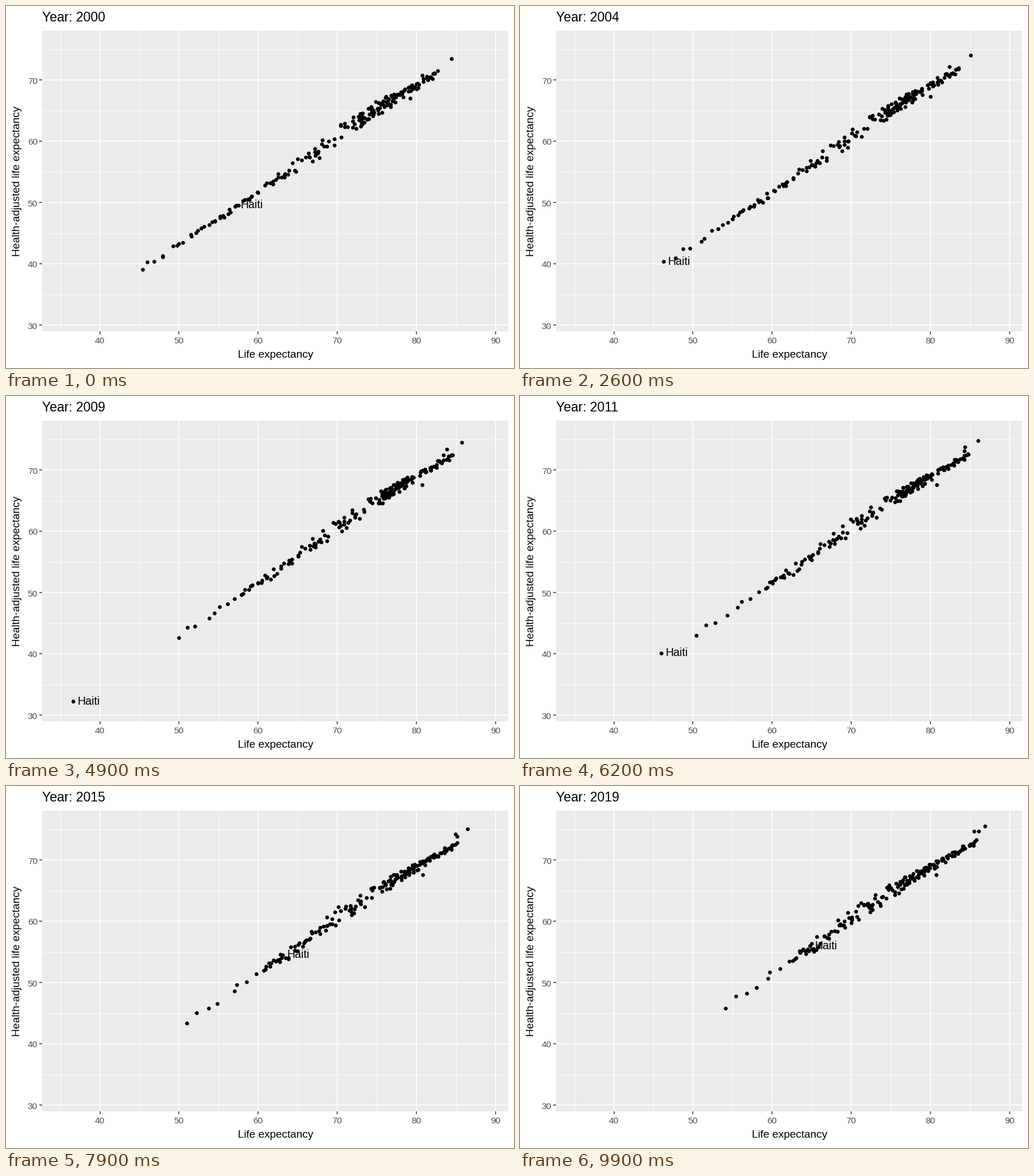
A matplotlib script that plays this animation: 885 px wide and 632 px high, repeating every 10000 ms.

```python
import matplotlib.pyplot as plt
import numpy as np
from matplotlib.animation import FuncAnimation

W, H, FRAMES = 885, 632, 100
LEFT, RIGHT, TOP, BOTTOM = 63, 875, 43, 568
plt.rcParams["font.family"] = "Liberation Sans"

# Points move in straight lines between the survey years
YEARS = np.array([2000, 2010, 2015, 2019])
KEYS = np.round((YEARS - 2000) * (FRAMES - 1) / 19).astype(int)
COUNT = 178

# Life expectancy at a few quantiles of the crowd, per survey year
QUANTILES = [0, 0.04, 0.2, 0.47, 0.79, 1]
LIFE = [
    [45.2, 50.7, 60.6, 72.6, 77.3, 82.5],
    [50.4, 57.9, 65.7, 75.8, 78.8, 84.6],
    [50.8, 60.2, 66.7, 76.1, 80.3, 84.9],
    [54.2, 62.5, 68.2, 75.9, 80.8, 85.7],
]

# Countries apart from the crowd: life per survey year, healthy start, slope
SOLO = [
    ([57.2, 35.35, 63.0, 64.8], 49.6, 0.842),  # the labelled one
    ([84.4, 85.8, 86.4, 86.9], 73.5, 0.80),
    ([80.7, 84.0, 84.9, 85.5], 70.8, 0.82),
    ([78.0, 83.7, 85.1, 86.1], 68.1, 0.81),
    ([79.2, 80.8, 80.8, 80.7], 67.0, 0.40),
]


def healthy(life, year):
    base = np.interp(life, [45, 55, 65, 71, 77, 83, 87],
                     [39.1, 47.4, 56.1, 61.9, 66.9, 71.5, 74.2])
    return base - 0.02 * (year - 2000)


def build_states():
    rng = np.random.default_rng(12)
    u = np.linspace(0, 1, COUNT)
    u += 0.04 * u * (1 - u) * rng.normal(size=COUNT)
    resid = np.clip(rng.normal(size=COUNT), -1.7, 1.7)
    states = []
    for k, year in enumerate(YEARS):
        x = np.interp(u, QUANTILES, LIFE[k]) + rng.normal(0, 0.2, COUNT)
        spread = 0.2 + 0.6 * np.exp(-((x - 70) / 9) ** 2)
        y = healthy(x, year) + spread * (resid + rng.normal(0, 0.15, COUNT))
        solo = [(life[k], start + slope * (life[k] - life[0])) for life, start, slope in SOLO]
        states.append(np.vstack([solo, np.column_stack([x, y])]))
    return states


STATES = build_states()


def positions(frame):
    k = min(np.searchsorted(KEYS, frame, side="right") - 1, len(KEYS) - 2)
    t = (frame - KEYS[k]) / (KEYS[k + 1] - KEYS[k])
    return (1 - t) * STATES[k] + t * STATES[k + 1]


def px(life):
    return 163.5 + 13.79 * (life - 40)


def py(health):
    return 129.3 + 10.7 * (70 - health)


fig = plt.figure(figsize=(W / 72, H / 72), dpi=72, facecolor="white")
ax = fig.add_axes([0, 0, 1, 1])
ax.set(xlim=(0, W), ylim=(H, 0))
ax.axis("off")
ax.add_patch(plt.Rectangle((LEFT, TOP), RIGHT - LEFT, BOTTOM - TOP, fc="#EBEBEB", lw=0))


def line(xs, ys, color, width):
    ax.plot(xs, ys, color=color, lw=width, solid_capstyle="butt", zorder=2)


def label(x, y, text, size, color="black", **kw):
    return ax.text(x, y, text, fontsize=size, color=color, zorder=5, **kw)


for first, width in ((5, 0.8), (0, 1.6)):
    for v in range(30 + first, 91, 10):
        if v > 30:
            line([px(v)] * 2, [TOP, BOTTOM], "white", width)
        if v < 80:
            line([LEFT, RIGHT], [py(v)] * 2, "white", width)

for v in range(40, 91, 10):
    line([px(v)] * 2, [BOTTOM, BOTTOM + 4.7], "#333333", 1.5)
    label(px(v), 589, v, 15.4, "#4D4D4D", ha="center")
for v in range(30, 71, 10):
    line([LEFT - 4.7, LEFT], [py(v)] * 2, "#333333", 1.5)
    label(55, py(v) + 6.2, v, 15.4, "#4D4D4D", ha="right")

label(469.5, 614, "Life expectancy", 19, ha="center")
label(24.5, 305.5, "Health-adjusted life expectancy", 19, rotation=90,
      rotation_mode="anchor", ha="center", va="baseline")
title = label(63, 27, "", 22.9)
dots, = ax.plot([], [], "o", color="black", ms=6.7, mew=0, zorder=4)
tag = label(0, 0, "Haiti", 19.5)


def draw(frame):
    pts = positions(frame)
    x, y = px(pts[:, 0]), py(pts[:, 1])
    dots.set_data(x, y)
    tag.set_position((x[0] + 7.5, y[0] + 5.5))
    title.set_text(f"Year: {2000 + 19 * frame // (FRAMES - 1)}")
    return dots, tag, title


anim = FuncAnimation(fig, draw, frames=FRAMES, interval=100, repeat=True, repeat_delay=0)
plt.show()
```
